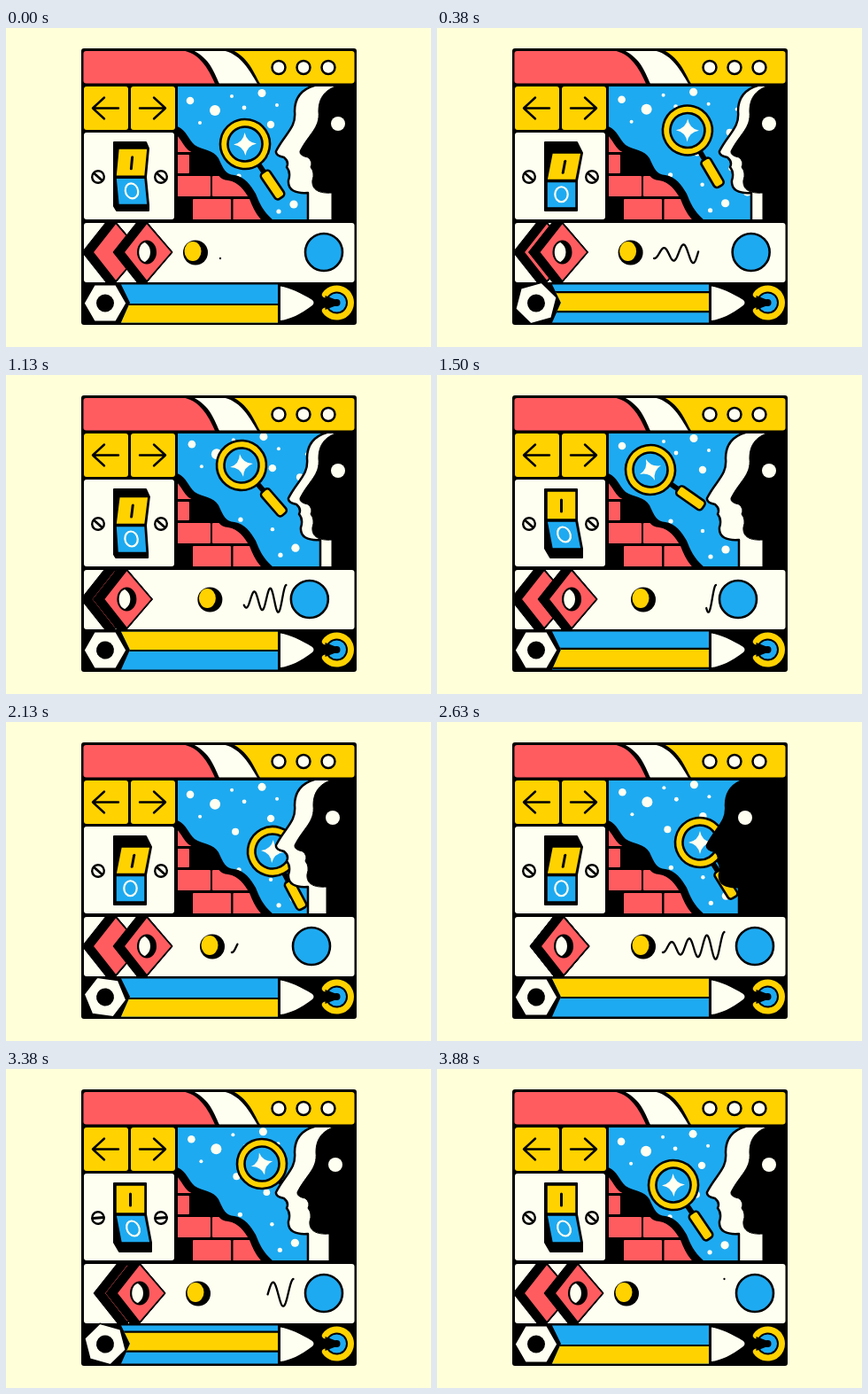
Recreate the animation shown at these times as an HTML page with a canvas. Size 480 by 360 pixels, loop 4.01 s.

```html
<!DOCTYPE html>
<html lang="en">
<head>
<meta charset="utf-8">
<title>Curious tiles</title>
<style>
html, body { margin: 0; width: 100%; height: 100%; overflow: hidden; background: #ffffd9; }
canvas { display: block; }
</style>
</head>
<body>
<canvas id="stage" width="480" height="360"></canvas>
<script>
const c = document.getElementById('stage').getContext('2d');
const RED = '#ff5c60', YELLOW = '#ffd200', BLUE = '#1eaaf1', WHITE = '#fffff1', BLACK = '#000';
const LOOP = 4010, STEPS = 32;
const TAU = Math.PI * 2, DEG = Math.PI / 180;

// ---- timing ----
const KEYS = [0, 6, 12, 17, 21, 27, 31];

// Monotone cubic through the looping key values
function track(k, ...v) {
  const n = KEYS.length;
  const at = i => KEYS[(i + n) % n] + STEPS * Math.floor(i / n);
  const val = i => v[(i + n) % n];
  const slope = i => (val(i + 1) - val(i)) / (at(i + 1) - at(i));
  const tangent = i => {
    const a = slope(i - 1), b = slope(i);
    return a * b <= 0 ? 0 : 2 * a * b / (a + b);
  };
  let i = n - 1;
  while (KEYS[i] > k) i--;
  const h = at(i + 1) - at(i), u = (k - at(i)) / h, w = 1 - u;
  return val(i) * (1 + 2 * u) * w * w + val(i + 1) * u * u * (3 - 2 * u) +
    h * u * w * (tangent(i) * w - tangent(i + 1) * u);
}

function smooth(a, b, x) {
  const u = Math.min(1, Math.max(0, (x - a) / (b - a)));
  return u * u * (3 - 2 * u);
}

// ---- drawing helpers ----
function paint(path, fill, line = 0, stroke = BLACK) {
  if (fill) { c.fillStyle = fill; c.fill(path); }
  if (line) { c.lineWidth = line; c.strokeStyle = stroke; c.stroke(path); }
}
const shape = (d, fill, line, stroke) => paint(new Path2D(d), fill, line, stroke);
const poly = (pts, fill, line) => shape('M' + pts.join(' ') + 'Z', fill, line);

function oval(x, y, rx, ry, fill, line, stroke) {
  const p = new Path2D();
  p.ellipse(x, y, rx, ry, 0, 0, TAU);
  paint(p, fill, line, stroke);
}
const disc = (x, y, r, fill, line, stroke) => oval(x, y, r, r, fill, line, stroke);

function box(x, y, w, h, fill, r = 3) {
  const p = new Path2D();
  p.roundRect(x, y, w, h, r);
  paint(p, fill);
  return p;
}

function group(x, y, angle, draw, clip) {
  c.save();
  if (clip) c.clip(clip);
  c.translate(x, y);
  c.rotate(angle);
  draw();
  c.restore();
}

// ---- tiles ----
function header() {
  const clip = box(87.5, 26, 306, 36.5, BLACK);
  group(0, 0, 0, () => {
    shape('M87 25H197C216 27 227 42 236 63H87Z', RED);
    shape('M211 25H243C264 28 274 46 284 63H241C234 47 229 34 211 25Z', WHITE);
    shape('M256 25H394V63H287C279 49 274 34 256 25Z', YELLOW);
  }, clip);
  for (const x of [308, 336, 364]) disc(x, 44.5, 7.5, WHITE, 2.5);
}

function arrows() {
  box(88, 66, 50, 49, YELLOW);
  box(141, 66, 50, 49, YELLOW);
  for (const [x, angle] of [[113, 0], [165, Math.PI]])
    group(x, 90.5, angle, () => shape('M-15 0H14M-2-12L-15 0L-2 12', null, 2.4));
}

function toggle(k) {
  const p = k % 16;
  const up = p > 12 ? smooth(15, 17, p) : Math.min(smooth(-1, 1, p), 1 - smooth(8, 10.5, p));
  const mix = (a, b) => a + (b - a) * up;
  const dx = mix(0, 6), top = mix(131, 141), mid = mix(164, 172.5), low = mix(196, 203), bx = 6 - dx;
  box(88, 118, 102, 98, WHITE);

  const turn = (42 + 180 * smooth(25, 28, k)) * DEG;
  for (const x of [104, 175]) group(x, 168, turn, () => {
    disc(0, 0, 6.8, WHITE, 2.4);
    shape('M-6 0H6', null, 2.8);
  });

  poly([122, 129, 158, 129, 158 + dx, top, 158, mid, 158 + bx, low, 158 + bx, 206,
    122 + bx, 206, 122, 206 - 1.7 * bx], BLACK, 2);
  poly([124 + dx, top, 157 + dx, top, 157, mid - 1, 124, mid - 1], YELLOW, 1.5);
  poly([124, mid + 1, 157, mid + 1, 157 + bx, low, 124 + bx, low], BLUE, 1.5);
  c.save();
  c.transform(1, 0, -dx / 32, 1, 140.5 + dx / 2, (top + mid) / 2);
  shape('M0-6.5V6.5', null, 3);
  c.restore();
  c.save();
  c.transform(1, 0, bx / 32, 1, 140.5 + bx / 2, (mid + low) / 2);
  oval(0, 0, 7.2, 8.5, null, 2.2, WHITE);
  c.restore();
}

const STARS = [
  [209, 80, 4.3], [237, 91, 6], [290, 71.5, 4.5], [270, 88, 2.4], [256, 75, 2], [220, 105, 2],
  [307, 85, 2], [300, 107, 4.2], [260, 122, 4], [294, 140, 3.8], [264, 165, 2.6], [300, 176, 2.2],
  [326, 197, 4.6], [309, 205, 2.6], [331, 117, 4], [339, 91, 2], [332, 158, 2.4], [351, 184, 5]
];

function wall() {
  const slope = new Path2D('M193 111C203 114 206 126 213 132C222 138 234 137 240 147C246 160 248 165 258 166' +
    'C270 168 276 177 282 187C286 197 290 207 302 217V230H193Z');
  paint(slope, BLACK);
  c.save();
  c.translate(-7, 6);
  c.clip(slope);
  c.translate(7, -6);
  box(190, 112, 26, 28, RED, 1);
  box(190, 143, 17, 21, RED, 1);
  box(190, 167, 41, 23, RED, 1);
  box(233, 167, 45, 23, RED, 1);
  box(211, 193, 43, 26, RED, 1);
  box(256.5, 193, 45, 26, RED, 1);
  c.restore();
}

function lens(k) {
  const x = track(k, 270, 291, 241, 301, 297, 289, 267);
  const y = track(k, 131, 100, 107, 146, 136, 107, 131);
  const angle = track(k, 56, 63, 35, 62, 58, 44, 56) * DEG;
  group(x, y, angle, () => {
    shape('M26 0H42', null, 6);
    const grip = new Path2D();
    grip.roundRect(38, -6, 35, 12, 4);
    paint(grip, YELLOW, 2.6);
    disc(0, 0, 28, YELLOW, 2.6);
    disc(0, 0, 19.5, BLUE, 2.6);
    c.rotate(-58 * DEG);
    shape('M0-13Q2-2 13 0Q2 2 0 13Q-2 2-13 0Q-2-2 0-13Z', WHITE);
  });
}

const HEAD = 'M400 64H352C334 68 326 78 326 94C328 113 315 119 305 139Q304 144 314 146' +
  'Q320 151 317 157Q322 163 319 172C318 183 327 187 341 186V220H400Z';

function sky(k) {
  const clip = box(194, 66, 199, 150, BLUE, 0);
  group(0, 0, 0, () => {
    const sway = Math.cos(k / 16 * TAU);
    for (const [x, y, r] of STARS) disc(x - sway, y + 2 * sway, r, WHITE);
    wall();
    lens(k);
    group(track(k, 0, 28, 0, 0, 0, 0, 0), 0, 0, () => shape(HEAD, WHITE, 2.5));
    group(track(k, 27, 27, 27, 21, 0, 24, 27), 0, 0, () => {
      shape(HEAD, BLACK, 1);
      disc(348, 108, 8, WHITE);
    });
  }, clip);
}

function diamond(x, hole) {
  group(x, 253, 0, () => {
    shape('M0-34L29 0L0 34H-11L-38 0L-11-34Z', BLACK, 1);
    shape('M0-33L28.5 0L0 33L-26 0Z', RED, 1.8);
    if (!hole) return;
    oval(0, 0, 11, 13.5, BLACK);
    shape('M-2-11C6-6 6 6-2 11C-11 9-11-9-2-11Z', WHITE);
  });
}

function spring(from, to, k) {
  const p = k % 16, start = smooth(6.6, 14, p), end = smooth(0, 5, p);
  c.beginPath();
  for (let i = 0; i <= 120; i++) {
    const u = start + (end - start) * i / 120;
    const y = 255 - 2 * u + (5 + 11 * u) * Math.cos(7 * Math.PI * u);
    c.lineTo(from + (to - from) * u, y);
  }
  c.lineWidth = 2.3;
  c.strokeStyle = BLACK;
  c.stroke();
}

function strip(k) {
  const clip = box(88, 220, 305.5, 67, WHITE);
  group(0, 0, 0, () => {
    diamond(track(k, 124, 124, 121, 124, 143, 137, 124), false);
    diamond(track(k, 159, 124, 152, 159, 143, 151, 159), true);
  }, clip);
  const ball = track(k, 214, 225.5, 233, 233, 233, 217, 214);
  const disk = track(k, 359, 348, 340, 345, 359, 359, 359);
  disc(ball, 253.5, 14, BLACK);
  oval(ball - 3, 252, 9.5, 11, YELLOW);
  spring(242 + 0.68 * (ball - 214), 324.5 - (359 - disk) / 2, k);
  disc(disk, 253, 21, BLUE, 2.6);
}

function pencil(k) {
  const p = k % 16;
  const roll = Math.min(smooth(1, 4.5, p), 1 - smooth(10, 12.6, p));
  const y = 312 - 23 * roll;
  group(0, 0, 0, () => {
    c.fillStyle = BLUE;
    c.fillRect(125, 288, 185, 48);
    c.fillStyle = YELLOW;
    c.fillRect(125, y, 185, 22);
    shape(`M125 ${y}H310M125 ${y + 22}H310`, null, 2.2);
  }, new Path2D('M130 289.5H307V332.5H130L140 310Z'));
  shape('M310 291.5C320 293 333 299 346 307Q349 310 346 313C333 323 320 329 310 330Z', WHITE);

  const turn = 60 * (smooth(0, 4.5, p) - smooth(9, 12, p)) * DEG;
  group(112, 310.5, turn, () => {
    const hex = [];
    for (let i = 0; i < 6; i++) hex.push(24 * Math.cos(i * TAU / 6), 24 * Math.sin(i * TAU / 6));
    poly(hex, WHITE, 1.5);
    disc(0, 0, 10, BLACK);
  });

  group(373.5, 310, 0, () => {
    const ring = new Path2D();
    ring.arc(0, 0, 16, -145 * DEG, 145 * DEG);
    paint(ring, null, 7, YELLOW);
    disc(0, 0, 10.5, BLUE);
    disc(0, 0, 4, BLACK);
    shape('M0-3L-13-8V8L0 3Z', BLACK);
  });
}

function frame(now) {
  const t = now % LOOP;
  const k = Math.min(STEPS - 1, Math.floor(Math.floor(t / 10) / 12.5));
  c.fillStyle = '#ffffd9';
  c.fillRect(0, 0, 480, 360);
  c.lineJoin = c.lineCap = 'round';
  box(85, 23, 311, 312, BLACK, 3);
  header();
  arrows();
  toggle(k);
  sky(k);
  strip(k);
  pencil(k);
  requestAnimationFrame(frame);
}
frame(performance.now());
</script>
</body>
</html>
```
